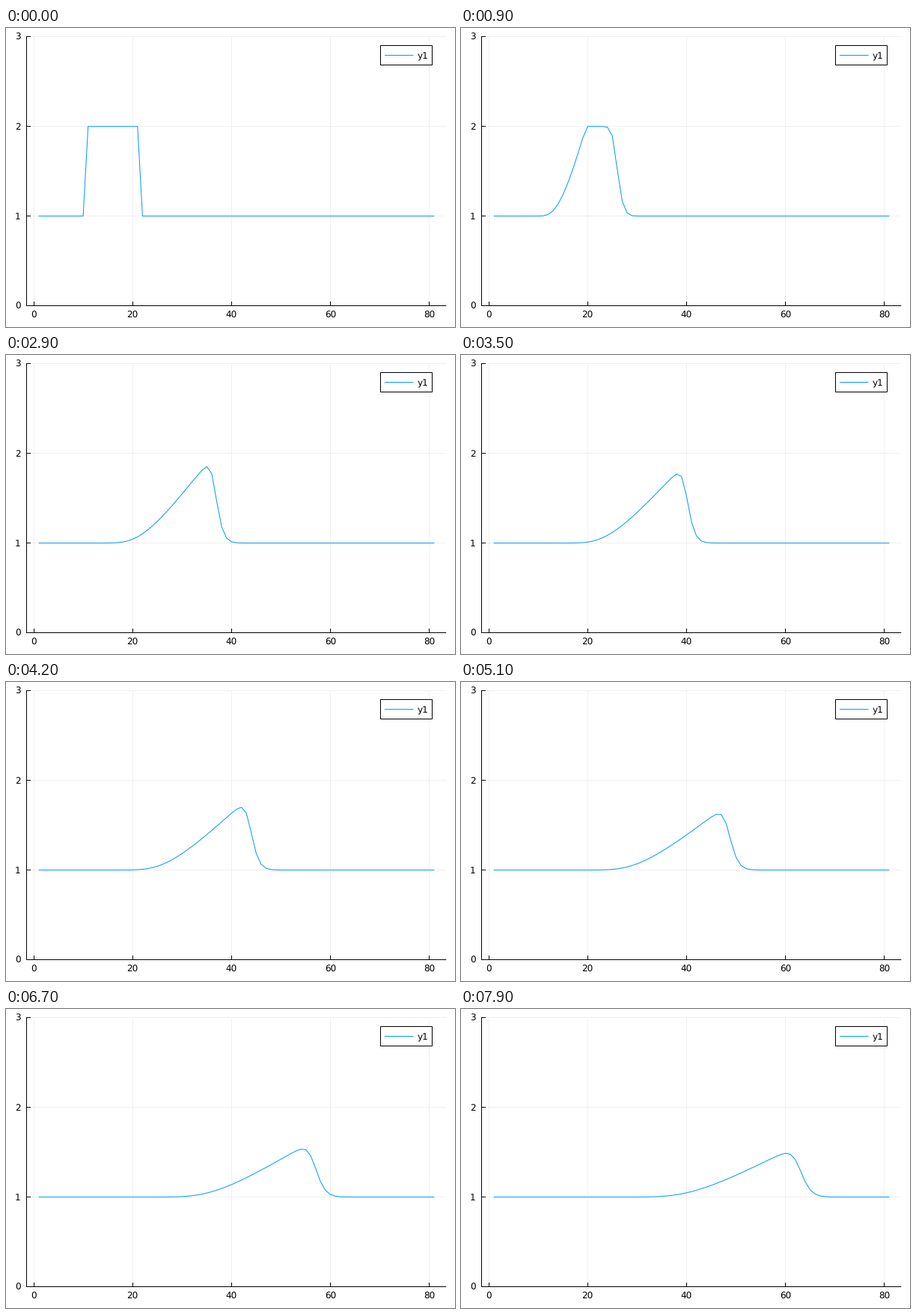
Write a matplotlib script that moves like this. It is 600 px wide and 400 px high and loops after 8000 ms.

```python
import numpy as np
import matplotlib.pyplot as plt
from matplotlib.animation import FuncAnimation
from matplotlib.patches import Rectangle

W, H, DPI = 600, 400, 100
PX = 72 / DPI                      # one pixel in points
FRAMES, INTERVAL = 80, 100
NX, CFL = 81, 0.4                  # grid points, dt / dx
LEFT, RIGHT, TOP, BOTTOM = 27.75, 588.2, 11.8, 371.5
BLUE = "#009AF9"

plt.rcParams["font.family"] = "DejaVu Sans"
plt.rcParams["font.size"] = 12 * PX
plt.rcParams["text.hinting"] = "none"
plt.rcParams["path.simplify"] = False
plt.rcParams["path.snap"] = False


def px(x):
    return LEFT + (x + 1.4) / 84.8 * (RIGHT - LEFT)


def py(y):
    return BOTTOM - y / 3 * (BOTTOM - TOP)


def crisp(v):
    """Centre of the pixel that holds v."""
    return np.floor(v) + 0.5


def solve():
    """Nonlinear convection of a square pulse, first-order upwind."""
    u = np.ones(NX)
    u[10:21] = 2
    states = [u]
    for _ in range(FRAMES - 1):
        nxt = u.copy()
        nxt[1:] -= CFL * u[1:] * np.diff(u)
        states.append(nxt)
        u = nxt
    return states


fig = plt.figure(figsize=(W / DPI, H / DPI), dpi=DPI, facecolor="white")
ax = fig.add_axes([0, 0, 1, 1])
ax.set_xlim(0, W)
ax.set_ylim(H, 0)
ax.axis("off")


def line(xs, ys, color="black", **kw):
    return ax.plot(xs, ys, color=color, lw=PX, solid_capstyle="butt", **kw)[0]


x0, y0 = crisp(LEFT), crisp(BOTTOM)

# Grid, ticks and labels
for v in range(0, 81, 20):
    x = crisp(px(v))
    line([x, x], [TOP, BOTTOM], alpha=0.06, zorder=1)
    line([x, x], [y0, y0 - 5.5], zorder=3)
    ax.text(px(v), 388, str(v), ha="center", va="baseline")
for v in range(4):
    y = crisp(py(v))
    line([LEFT, RIGHT], [y, y], alpha=0.06, zorder=1)
    line([x0, x0 + 5.5], [y, y], zorder=3)
    ax.text(19.5, y + 4.5, str(v), ha="right", va="baseline")

# Axes
line([x0 - 0.5, RIGHT], [y0, y0], zorder=3)
line([x0, x0], [crisp(TOP) - 0.5, y0 + 0.5], zorder=3)

# Legend
ax.add_patch(Rectangle((500.5, 23.5), 69, 26, fc="white", ec="black",
                       lw=PX, zorder=5))
line([506, 544.5], [36.5, 36.5], BLUE, zorder=6)
ax.text(550, 41, "y1", va="baseline", zorder=6)

STATES = solve()
curve = line(px(np.arange(1, NX + 1)), py(STATES[0]), BLUE, zorder=4)


def update(i):
    curve.set_ydata(py(STATES[i]))
    return (curve,)


anim = FuncAnimation(fig, update, frames=FRAMES, interval=INTERVAL,
                     repeat=True, repeat_delay=0, blit=False)
plt.show()
```
